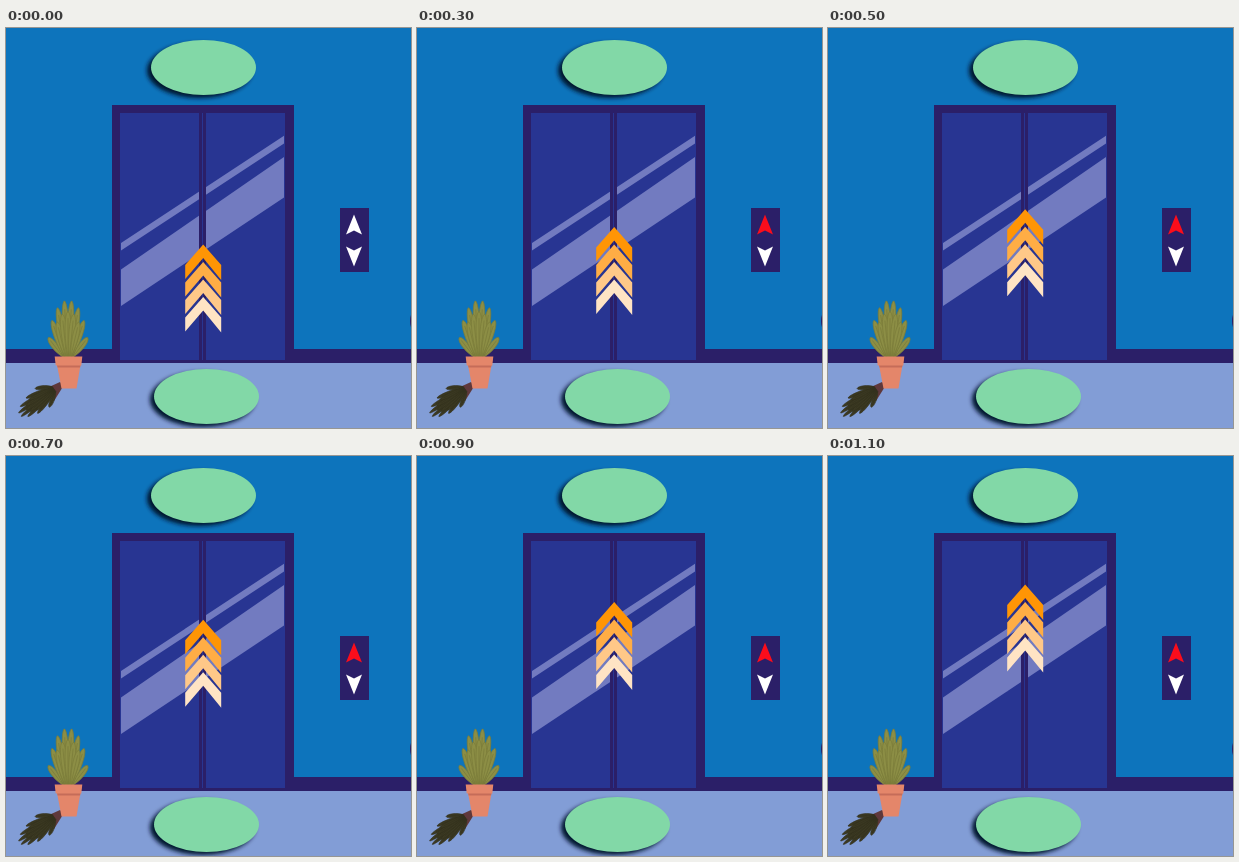
An HTML page for the animation above (1200 ms loop, 405 by 400 pixels).

```html
<!DOCTYPE html>
<html lang="en">
<head>
<meta charset="utf-8">
<title>Elevator going up</title>
<style>
  html, body { margin: 0; width: 100%; height: 100%; overflow: hidden; background: #0d74bc; }
  svg { display: block; width: 405px; height: 400px; }
</style>
</head>
<body>
<svg viewBox="0 0 405 400">
  <defs>
    <filter id="blur" x="-20%" y="-30%" width="140%" height="160%">
      <feGaussianBlur stdDeviation="2"/>
    </filter>
    <g id="fan" stroke-linejoin="round" stroke-width=".8"></g>
    <path id="button" d="M0 -10.5L8 9.5L0 5.5L-8 9.5Z"/>
  </defs>

  <!-- room -->
  <rect width="405" height="400" fill="#0d74bc"/>
  <rect y="335" width="405" height="65" fill="#829dd6"/>
  <rect y="321" width="405" height="14" fill="#2b1f68"/>
  <ellipse cx="407" cy="293" rx="3" ry="8" fill="#2b1f68"/>

  <!-- doors -->
  <path d="M106 77H288V335H106Z" fill="#2b1f68"/>
  <path d="M114 85H279V332H114Z" fill="#283592"/>
  <path d="M115 215L278 107.7V115.5L115 222.5ZM115 241.5L278 129V169.5L115 278Z" fill="#727bc0"/>
  <path d="M193 85H200V332H193Z" fill="#2b1f68"/>
  <path d="M196.5 85V332" stroke="#283592"/>

  <!-- call buttons -->
  <path d="M334 180H363V244H334Z" fill="#2b1f68"/>
  <use id="up" href="#button" transform="translate(348 197)" fill="#fff"/>
  <use href="#button" transform="translate(348 228) scale(1 -1)" fill="#fff"/>

  <g id="discs"></g>

  <!-- potted plant and its shadow -->
  <path d="M43 359L54 354L58 357L48 373Z" fill="#5f383b"/>
  <use href="#fan" transform="translate(48 361) rotate(-127) scale(.6 .76)" fill="#3b3922" stroke="#33311e"/>
  <use href="#fan" transform="translate(62 329)" fill="#8c8e45" stroke="#7b7d3a"/>
  <path d="M51 337H74.5L70.5 360.5H55.5Z" fill="#e4866a"/>
  <path d="M51 337H74.5L74 339.5H51.6Z" fill="#c56c59"/>
  <path d="M48.7 328.5H76.3L75.3 337.5H49.7Z" fill="#e4866a"/>

  <g id="arrow"></g>
</svg>

<script>
const STEP = 100;
const STEPS = 12;
const $ = id => document.getElementById(id);

function add(parent, tag, attrs) {
  const el = document.createElementNS("http://www.w3.org/2000/svg", tag);
  for (const key in attrs) el.setAttribute(key, attrs[key]);
  parent.append(el);
}

function disc(cx, cy) {
  const size = { rx: 52.5, ry: 27.5 };
  add($("discs"), "ellipse", { cx: cx - 4, cy: cy + 3, ...size, fill: "#06182e", filter: "url(#blur)" });
  add($("discs"), "ellipse", { cx, cy, ...size, fill: "#82d8a7" });
}

// leaf with its tip on an ellipse around the foot of the plant
function leaf(angle, size) {
  const x = 21 * Math.sin(angle) * size, y = -57 * Math.cos(angle) * size;
  const len = Math.hypot(x, y), foot = x * .25;
  const side = (t, w) => `${foot + (x - foot) * t - y / len * w} ${y * t + x / len * w}`;
  add($("fan"), "path", {
    d: `M${foot} 0C${side(.4, 4)} ${side(.95, 4)} ${x} ${y}` +
       `C${side(.95, -4)} ${side(.4, -4)} ${foot} 0Z`
  });
  add($("fan"), "path", { d: `M${foot} 0L${side(.85, 0)}`, fill: "none" });
}

disc(197.5, 39.5);
disc(200.5, 368.5);

for (let i = -3.5; i <= 3.5; i++) leaf(i * .35, 1);
for (let i = -2; i <= 2; i++) leaf(i * .35, .8);

["#ff9505", "#ffad45", "#ffc888", "#ffe4c4"].forEach((fill, i) =>
  add($("arrow"), "path", {
    d: "M0 0L18 20.5V35.5L0 13.5L-18 34.5V20.5Z",
    transform: `translate(0 ${i * 17.5})`,
    fill
  }));

// the arrow climbs every second step, the button blinks in between
function draw(time) {
  const step = Math.floor(time / STEP) % STEPS;
  const y = 216.5 - 17.6 * Math.floor(step / 2);
  $("arrow").setAttribute("transform", `translate(197.2 ${y})`);
  $("up").setAttribute("fill", step % 2 ? "#fb0d1b" : "#fff");
}

const start = performance.now();
function tick() {
  draw(performance.now() - start);
  requestAnimationFrame(tick);
}
tick();
</script>
</body>
</html>
```
